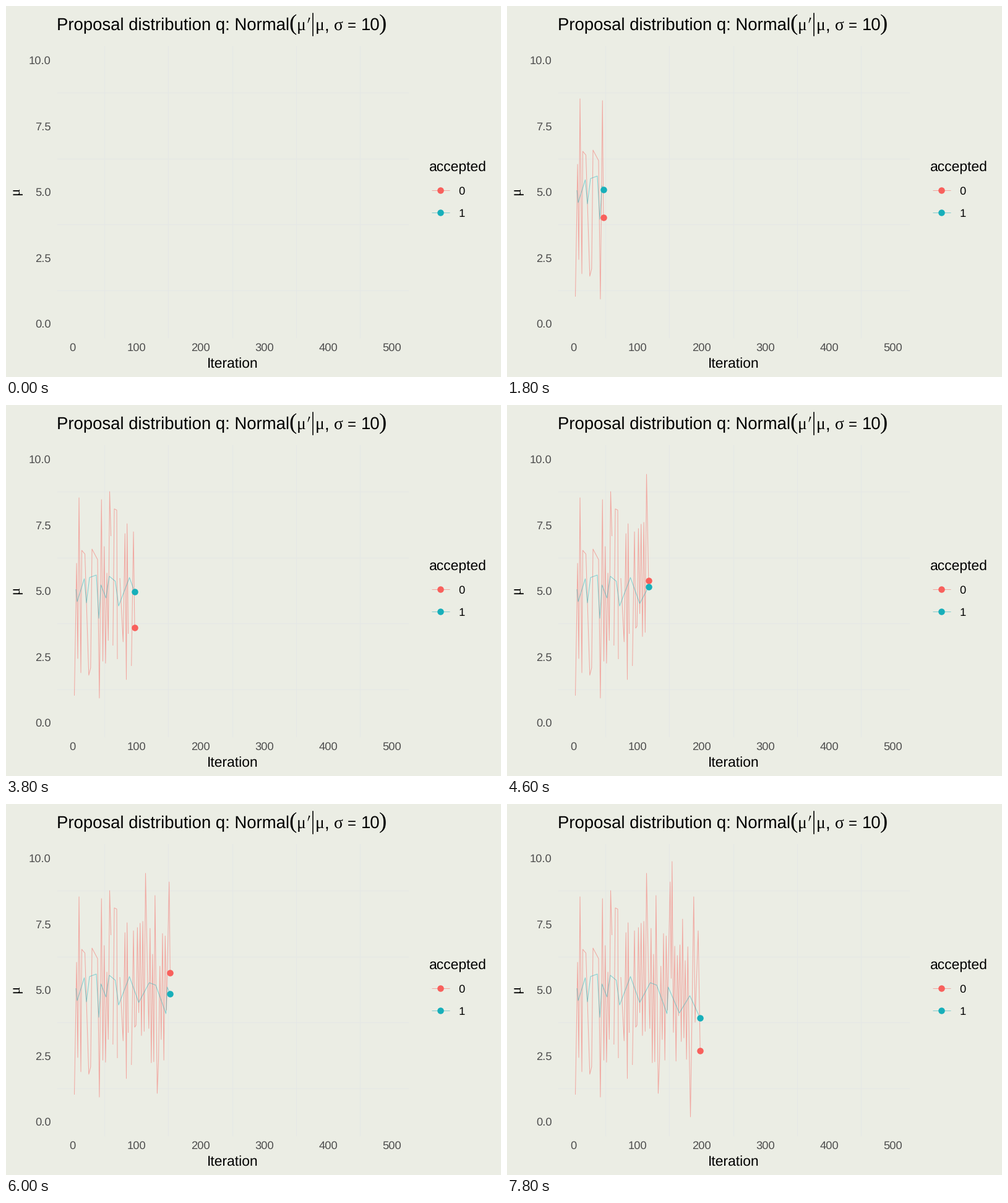
Animation of 800 by 600 pixels, one loop 8 s. Source, as a matplotlib script:

```python
import numpy as np
import matplotlib.pyplot as plt
from matplotlib.animation import FuncAnimation

plt.rcParams["text.hinting"] = "none"

W, H, DPI = 800, 600, 100
FRAMES, INTERVAL = 40, 200
BG, GRID = "#ebede4", "#e5e8e5"
RED, TEAL = "#f8605c", "#17afba"
BLACK, GREY = "#000000", "#4d4d4d"
BASE, SMALL, LARGE = 22.92, 18.33, 27.5
SANS, SERIF = "Liberation Sans", "Liberation Serif"

# Turning points of the rejected proposals, one list per unbroken run
REJECTED = [
    [(110.5, 470), (114.1, 256), (116, 410), (118, 150), (121, 433),
     (122.4, 235), (127.5, 241), (133.8, 437), (136.8, 425), (139, 233),
     (148, 250), (150.9, 474), (154.3, 153), (167.5, 140), (169.6, 212)],
    [(172.8, 389), (175, 168), (179, 170), (180, 411)],
    [(184, 280), (189.3, 383), (192.3, 208), (194.5, 444), (195.7, 192),
     (197.6, 370)],
    [(202.7, 422), (206, 205), (208, 361), (225.5, 112), (228.8, 283),
     (240.8, 148), (244.4, 468), (263.7, 126), (265.4, 282), (266.8, 93),
     (296.5, 506), (301.8, 150), (304, 353), (309, 205), (312.2, 400)],
]
ACCEPTED = [
    (113, 298), (115, 318), (126.5, 281), (130, 320), (135, 279),
    (146, 275), (150, 345), (153.5, 291), (161.5, 312), (167, 277),
    (176.6, 285), (182, 325), (199.5, 279), (214.5, 321), (231.5, 289),
    (242, 293), (258.5, 339), (260.5, 296), (278.5, 338), (295.5, 310),
    (311.8, 345.5)]

fig = plt.figure(figsize=(W / DPI, H / DPI), dpi=DPI, facecolor=BG)
ax = fig.add_axes([0, 0, 1, 1])
ax.set_xlim(0, W)
ax.set_ylim(H, 0)
ax.axis("off")


def pt(px):
    return px * 72 / DPI


def label(x, y, s, size, color=BLACK, font=SANS, ha="left", **kw):
    ax.text(x, y, s, fontsize=pt(size), color=color, family=font, ha=ha,
            va="baseline", **kw)


def trace(color, xs=(), ys=()):
    return ax.plot(xs, ys, color=color, lw=pt(1), alpha=0.5, zorder=2,
                   solid_joinstyle="round", solid_capstyle="butt")[0]


def marker(color, xs=(), ys=()):
    return ax.plot(xs, ys, "o", color=color, ms=pt(10.5), mew=0,
                   zorder=3)[0]


def draw_title():
    label(82, 39, "Proposal distribution q: Normal", LARGE)
    label(457.5, 39, "(", 37, font=SERIF)
    label(470, 39, "μ", LARGE, font=SERIF)
    ax.fill([489.6, 491.6, 488.2, 487.4], [18.5, 19.3, 27.5, 27.2],
            color=BLACK, lw=0)
    ax.plot([496.3, 496.3], [12, 48], color=BLACK, lw=pt(1.6))
    label(500, 39, "μ", LARGE, font=SERIF)
    label(514.5, 39, ",", LARGE)
    label(530, 39, "σ", LARGE, font=SERIF)
    label(552, 39, "=", 24)
    label(573.5, 39, "10", LARGE)
    label(603, 39, ")", 37, font=SERIF)


def draw_axes():
    for i in range(5):
        x = 159.2 + 103.25 * i
        ax.plot([x, x], [65, 536], color=GRID, lw=pt(1.1), zorder=1)
    for i in range(4):
        y = 139.9 + 106.65 * i
        ax.plot([82.5, 649.5], [y, y], color=GRID, lw=pt(1.1), zorder=1)
    for i in range(6):
        label(107.6 + 103.25 * i, 558.3, str(100 * i), SMALL, GREY,
              ha="center")
    for i in range(5):
        label(72.8, 520.2 - 106.5 * i, f"{2.5 * i:.1f}", SMALL, GREY,
              ha="right")
    label(366, 584.3, "Iteration", BASE, ha="center")
    label(21, 300, "μ", BASE, font=SERIF, ha="center", rotation=90,
          rotation_mode="anchor")


def draw_legend():
    label(683.5, 267.5, "accepted", BASE)
    for name, color, y in (("0", RED, 298.2), ("1", TEAL, 334.2)):
        trace(color, [688, 717], [y, y])
        marker(color, [702.2], [y])
        label(731.3, y + 6.7, name, SMALL)


def fill_spans(run, rng, longest=11, step=2.1):
    """Put random up-and-down proposals into the long spans of a run."""
    points = [run[0]]
    for (x0, _), (x1, y1) in zip(run, run[1:]):
        if x1 - x0 > longest:
            xs = np.linspace(x0, x1, round((x1 - x0) / step) + 1)[1:-1]
            for i, x in enumerate(xs):
                swing = rng.uniform(20, 120)
                points.append((x, 300 + swing * (-1) ** i))
        points.append((x1, y1))
    return points


class Reveal:
    """A path uncovered from the left, with a dot at its moving head."""

    def __init__(self, runs, color, speed):
        self.runs = [np.array(r, float) for r in runs]
        self.speed = speed
        self.line, self.dot = trace(color), marker(color)

    def show(self, k):
        head = 109 + self.speed * k
        parts, tip = [np.empty((0, 2))], None
        for run in self.runs:
            x, y = run.T
            if head < x[0]:
                break
            part = run[x <= head]
            if head <= x[-1] + 0.05:
                tip = (head, np.interp(head, x, y))
                part = np.vstack([part, tip])
            parts += [part, [(np.nan, np.nan)]]
        self.line.set_data(*np.vstack(parts).T)
        self.dot.set_data(*(([tip[0]], [tip[1]]) if tip else ([], [])))


draw_title()
draw_axes()
draw_legend()
rng = np.random.default_rng(4)
reveals = [Reveal([fill_spans(r, rng) for r in REJECTED], RED, 5.21),
           Reveal([ACCEPTED], TEAL, 5.2)]


def update(k):
    for r in reveals:
        r.show(k)
    return [a for r in reveals for a in (r.line, r.dot)]


anim = FuncAnimation(fig, update, frames=FRAMES, interval=INTERVAL,
                     init_func=lambda: update(0), repeat=True,
                     repeat_delay=0, blit=False)
plt.show()
```
